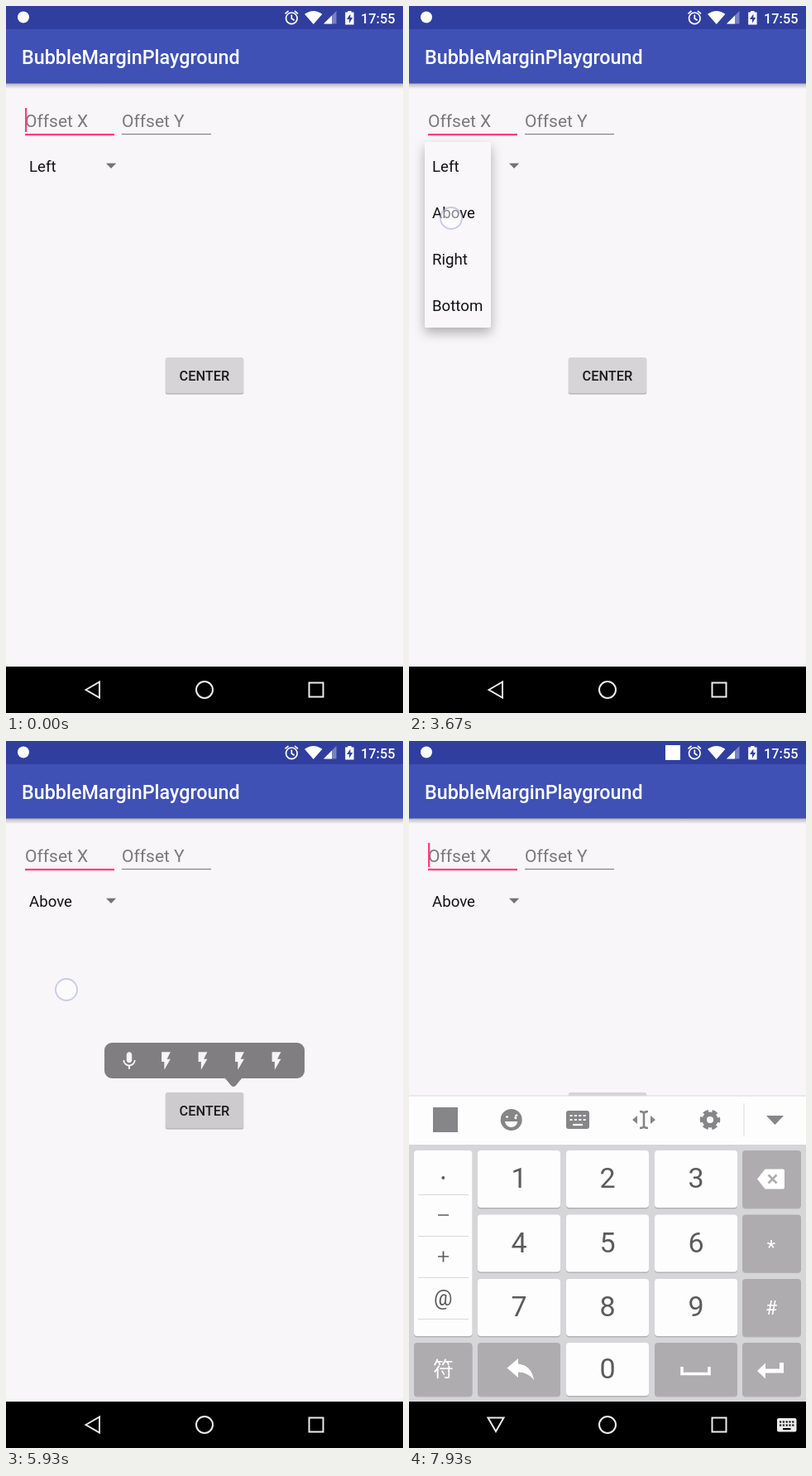
Recreate the animation shown at these times as an HTML page. Size 480 px wide and 853 px high, loop 8000 ms.

```html
<!DOCTYPE html>
<html lang="en">
<head>
<meta charset="utf-8">
<title>Popup placement demo</title>
<style>
html, body { margin: 0; width: 100%; height: 100%; overflow: hidden; background: #f8f6f9; }
svg { display: block; width: 100vw; height: 100vh; }
text { font-family: Roboto, sans-serif; }
.medium { font-weight: 500; }
.mid { text-anchor: middle; }
.hint { font-size: 21px; fill: #7b797c; }
.item { font-size: 18.67px; fill: #111; }
.digit { font-size: 34px; fill: #5b5a5c; text-anchor: middle; }
.sym { font-size: 25px; fill: #5b5a5c; text-anchor: middle; }
.light { fill: #fff; }
.line { fill: none; stroke: #ececec; stroke-width: 2; }
.white { fill: #fdfdfe; }
.grey { fill: #aeacaf; }
.icon { fill: #868588; }

/* One shared 8 s timeline: 1% = 80 ms */
.cursor, .left, .above, .popL, .popA, .menu, .row, .btn, .ripple, .kb, .ime, .back, .tap {
  animation: 8s linear infinite;
}
.cursor, .left, .above, .ime, .back { animation-timing-function: step-end; }
.cursor { animation-name: cursor; }
.left { animation-name: left; }
.above { animation-name: above; }
.popL { animation-name: popL; }
.popA { animation-name: popA; }
.menu { animation-name: menu; filter: drop-shadow(0 6px 7px rgba(0,0,0,.3)); }
.row { animation-name: row; }
.btn { animation-name: btn; }
.ripple { animation-name: ripple; }
.kb { animation-name: kb; }
.ime { animation-name: ime; }
.back { animation-name: back; }
.tap {
  animation-name: tap; animation-delay: calc(var(--t) - 8s);
  fill: rgba(255,255,255,.5); stroke: rgba(150,150,205,.5); stroke-width: 1.8;
}
@keyframes cursor {
  0%, 7.5%, 85%, 99.1%, 100% { opacity: 1 }
  1.625%, 14.1%, 92.4% { opacity: 0 }
}
@keyframes left { 0% { opacity: 1 } 48.3%, 100% { opacity: 0 } }
@keyframes above { 0% { opacity: 0 } 48.3%, 100% { opacity: 1 } }
@keyframes popL { 0%, 14.1%, 28.3%, 100% { opacity: 0 } 16.75%, 25.8% { opacity: 1 } }
@keyframes popA { 0%, 59.1%, 76.6%, 100% { opacity: 0 } 61.6%, 73.9% { opacity: 1 } }
@keyframes menu { 0%, 35.75%, 50.4%, 100% { opacity: 0 } 38.2%, 47.5% { opacity: 1 } }
@keyframes row { 0%, 46.25%, 50.5%, 100% { opacity: 0 } 47.2%, 50.4% { opacity: 1 } }
@keyframes btn {
  0%, 12.5%, 28.1%, 58.4%, 84.5%, 100% { fill: #d6d4d7 }
  13.75%, 25.6% { fill: #c8c6c9 }
  60%, 84.1% { fill: #cdcbce }
}
@keyframes ripple {
  0%, 33.9% { opacity: 0; transform: scale(.3) }
  34% { opacity: 1; transform: scale(.3) }
  35% { opacity: 1; transform: scale(1) }
  36.9%, 100% { opacity: 0; transform: scale(2.4) }
}
@keyframes kb {
  0%, 87% { opacity: 0; transform: translateY(37px); animation-timing-function: cubic-bezier(.2,.7,.3,1) }
  92%, 100% { opacity: 1; transform: none }
}
@keyframes ime { 0% { opacity: 0 } 85%, 100% { opacity: 1 } }
@keyframes back { 0% { opacity: 1 } 85%, 100% { opacity: 0 } }
@keyframes tap { 0% { opacity: 1 } 1.2% { opacity: .9 } 2.5%, 100% { opacity: 0 } }
</style>
</head>
<body>
<svg viewBox="0 0 480 853" preserveAspectRatio="none">
  <defs>
    <linearGradient id="shade" x2="0" y2="1">
      <stop stop-color="#000" stop-opacity=".28"/>
      <stop offset="1" stop-color="#000" stop-opacity="0"/>
    </linearGradient>
    <path id="bolt" d="M7 2v11h3v9l7-12h-4l4-8z" transform="scale(1.08) translate(-12 -12)"/>
    <g id="bubble">
      <path fill="#757375" d="M9 0H233a9 9 0 0 1 9 9V34a9 9 0 0 1-9 9H166L159 51.5q-3 3-6 0L146 43H9a9 9 0 0 1-9-9V9a9 9 0 0 1 9-9z"/>
      <g fill="#f6f5f6">
        <path transform="translate(30 22) scale(1.08) translate(-12 -12)" d="M12 14c1.66 0 3-1.34 3-3V5c0-1.66-1.34-3-3-3S9 3.34 9 5v6c0 1.66 1.34 3 3 3zm5.3-3c0 3-2.54 5.1-5.3 5.1S6.7 14 6.7 11H5c0 3.41 2.72 6.23 6 6.72V21h2v-3.28c3.28-.48 6-3.3 6-6.72z"/>
        <use href="#bolt" x="74.5" y="22"/><use href="#bolt" x="119" y="22"/>
        <use href="#bolt" x="163.5" y="22"/><use href="#bolt" x="208" y="22"/>
      </g>
    </g>
  </defs>

  <rect width="480" height="853" fill="#f8f6f9"/>

  <!-- Bars -->
  <rect y="93" width="480" height="7" fill="url(#shade)"/>
  <rect y="28" width="480" height="65.5" fill="#3f51b5"/>
  <rect width="480" height="28" fill="#303f9f"/>
  <text class="medium light" x="19" y="70" font-size="23.33">BubbleMarginPlayground</text>
  <circle cx="21" cy="13.5" r="7" fill="#fff"/>
  <rect class="ime" x="310" y="5" width="18" height="18" fill="#fff"/>
  <g fill="none" stroke="#fff" stroke-width="1.7">
    <circle cx="345.3" cy="14.8" r="6.8"/>
    <path d="M345.3 10.5V15l3.3 2.2M337.5 9.3l4-3.3M353 9.3l-4-3.3"/>
  </g>
  <path fill="#fff" d="M361 9.8Q371.7 2.2 382.4 9.8L371.7 22z"/>
  <path fill="#fff" opacity=".35" d="M384 21.5L399.5 6V21.5z"/>
  <path fill="#fff" d="M384 21.5L394 11.5V21.5z"/>
  <path fill="#fff" d="M413.2 7.5V6H417.6V7.5H420.6V22.5H410.2V7.5z"/>
  <path fill="#303f9f" d="M416.4 9.5L412 16h3v4.8l4.2-6.8h-2.8z"/>
  <text class="medium light" x="429" y="20.5" font-size="16.33">17:55</text>

  <!-- Form -->
  <text class="hint" x="23" y="146">Offset X</text>
  <text class="hint" x="140" y="146">Offset Y</text>
  <rect x="23" y="154" width="108" height="2.3" fill="#ff4081"/>
  <rect x="140" y="154" width="108" height="1.2" fill="#858386"/>
  <rect class="cursor" x="23" y="123" width="2.3" height="29" fill="#ff4081"/>
  <g transform="translate(116 192.5)"><g class="ripple">
    <circle r="35" opacity=".012"/><circle r="12.5" fill="#e7e5e8"/>
  </g></g>
  <text class="item left" x="28" y="199.5">Left</text>
  <text class="item above" x="28" y="199.5">Above</text>
  <path fill="#747275" d="M121 189.7h12.2l-6.1 6.2z"/>

  <!-- Button -->
  <rect x="192.5" y="425" width="95" height="44" rx="2.5" opacity=".13"/>
  <rect x="193" y="425" width="94" height="43.2" rx="2.5" opacity=".14"/>
  <rect class="btn" x="193" y="424" width="94" height="43" rx="2.3" fill="#d6d4d7"/>
  <text class="medium mid" x="239.8" y="451.6" font-size="16.33" fill="#1c1b1d">CENTER</text>

  <!-- Popups -->
  <g class="popL" opacity="0"><use href="#bubble" x="0" y="416"/></g>
  <g class="popA" opacity="0"><use href="#bubble" x="119" y="364"/></g>
  <g class="menu" opacity="0">
    <rect x="19" y="164" width="80" height="224" rx="2" fill="#f9f7fa"/>
    <rect class="row" x="19" y="220" width="80" height="56" fill="#e2e0e3" opacity="0"/>
    <text class="item" x="28" y="199.5">Left</text>
    <text class="item" x="28" y="255.5">Above</text>
    <text class="item" x="28" y="311.5">Right</text>
    <text class="item" x="28" y="367.5">Bottom</text>
  </g>

  <!-- Touches -->
  <circle class="tap" style="--t:1s" cx="240" cy="446" r="13"/>
  <circle class="tap" style="--t:2s" cx="240" cy="646" r="13"/>
  <circle class="tap" style="--t:2.69s;stroke:rgba(150,150,160,.25)" cx="76" cy="193" r="13"/>
  <circle class="tap" style="--t:3.66s" cx="51" cy="256" r="13"/>
  <circle class="tap" style="--t:4.67s" cx="240" cy="446" r="13"/>
  <circle class="tap" style="--t:5.87s" cx="73" cy="300" r="13"/>
  <circle class="tap" style="--t:6.76s;stroke:rgba(150,150,160,.3)" cx="79" cy="133" r="13"/>

  <!-- Keyboard -->
  <g class="kb" opacity="0">
    <rect y="428" width="480" height="60" class="white"/>
    <rect y="427.5" width="480" height="1" fill="#d9d7da"/>
    <rect y="487" width="480" height="311" fill="#d6d5d8"/>
    <rect x="404.5" y="437" width="1" height="40" fill="#dddcde"/>
    <g class="icon">
      <rect x="29" y="442" width="30" height="30"/>
      <circle cx="123.7" cy="457" r="13"/>
      <rect x="190" y="446" width="28" height="22" rx="3"/>
      <path d="M270 457l6-5v10zM298 457l-6-5v10zM432 452h21l-10.5 11z"/>
    </g>
    <g fill="none" stroke="#868588">
      <path stroke-width="2.6" d="M279 447q5 0 5 3v14q0 3-5 3M289 447q-5 0-5 3M284 464q0 3 5 3"/>
      <circle cx="364" cy="457" r="6.8" stroke-width="5.5"/>
      <circle cx="364" cy="457" r="10" stroke-width="4.5" stroke-dasharray="6.2 4.27" stroke-dashoffset="3.1"/>
    </g>
    <g fill="none" stroke="#fff" stroke-width="2.2">
      <path d="M117 453.5h4M131 451l-4 2.5 4 2.5M194.5 452h19.5M194.5 457h19.5" stroke-dasharray="3 2.4"/>
      <path d="M198 463h12"/>
    </g>
    <path class="light" d="M116 459h15.4q-1.4 7-7.7 7t-7.7-7z"/>
    <g id="keys"></g>
    <path fill="none" stroke="#d8d7da" d="M11 547.5H72M11 597.5H72M11 647.5H72M11 697.5H72"/>
    <circle cx="41.3" cy="527" r="1.9" fill="#5b5a5c"/>
    <path fill="none" stroke="#5b5a5c" stroke-width="1.7" d="M35 572H48M35 622H48M41.5 615.5V628.5"/>
    <text class="sym" x="41.3" y="681">@</text>
    <text class="sym light" style="fill:#fff;font-size:24px" x="438" y="619">*</text>
    <text class="sym" style="fill:#fff;font-size:23px" x="438" y="692">#</text>
    <text class="sym" style="fill:#fff;font-family:'Noto Sans CJK SC','Noto Sans CJK',sans-serif" x="41.5" y="767">符</text>
    <g class="light">
      <path d="M421 528.5L430.5 516.5H452q2 0 2 2V538.5q0 2-2 2H430.5z"/>
      <path d="M421 760L431 750.5V757.5H448V750H453V762.5H431V769.5z"/>
      <path d="M118.5 756.5L132 745V751.5Q148 753 151 771Q144 761.5 132 761.5V768z"/>
    </g>
    <path fill="none" stroke="#fff" stroke-width="3.6" d="M330 755V763.5H363V755"/>
    <path stroke="#aeacaf" stroke-width="2.6" d="M434.5 523.5l10 10m0-10l-10 10"/>
  </g>

  <!-- Navigation -->
  <rect y="797" width="480" height="56"/>
  <g class="line">
    <path class="back" d="M96.5 825L113 815.5V834.5z"/>
    <path class="ime" opacity="0" d="M95.5 816.5H114.5L105 833z"/>
    <circle cx="240" cy="825" r="10"/>
    <rect x="366.5" y="816.5" width="17" height="17"/>
  </g>
  <g class="ime" opacity="0">
    <rect x="445" y="817" width="23.5" height="16.5" rx="2" fill="#ececec"/>
    <path fill="none" stroke="#000" stroke-width="2" stroke-dasharray="2.2 1.6" d="M448 821.5h18M448 825.5h18"/>
    <path stroke="#000" stroke-width="2" d="M452 830h9.5"/>
  </g>
</svg>
<script>
const keys = document.getElementById('keys');
const cols = [83, 190, 297], rows = [494, 571.5, 649, 726];
const box = (x, y, w, h, cls) =>
  `<rect x="${x}" y="${y + 1.5}" width="${w}" height="${h}" rx="4" opacity=".17"/>` +
  `<rect class="${cls}" x="${x}" y="${y}" width="${w}" height="${h}" rx="4"/>`;
const digit = (n, x, y, h) =>
  box(x, y, 100, h, 'white') + `<text class="digit" x="${x + 50}" y="${y + h / 2 + 10.5}">${n}</text>`;

let out = box(6, 494, 70.5, 224, 'white');
for (let i = 0; i < 9; i++) out += digit(i + 1, cols[i % 3], rows[Math.floor(i / 3)], 69);
out += digit(0, cols[1], rows[3], 64);
for (const y of rows) out += box(403, y, 71, y === rows[3] ? 64 : 69, 'grey');
out += box(6, rows[3], 70.5, 64, 'grey');
for (const x of [cols[0], cols[2]]) out += box(x, rows[3], 100, 64, 'grey');
keys.innerHTML = out;
</script>
</body>
</html>
```
